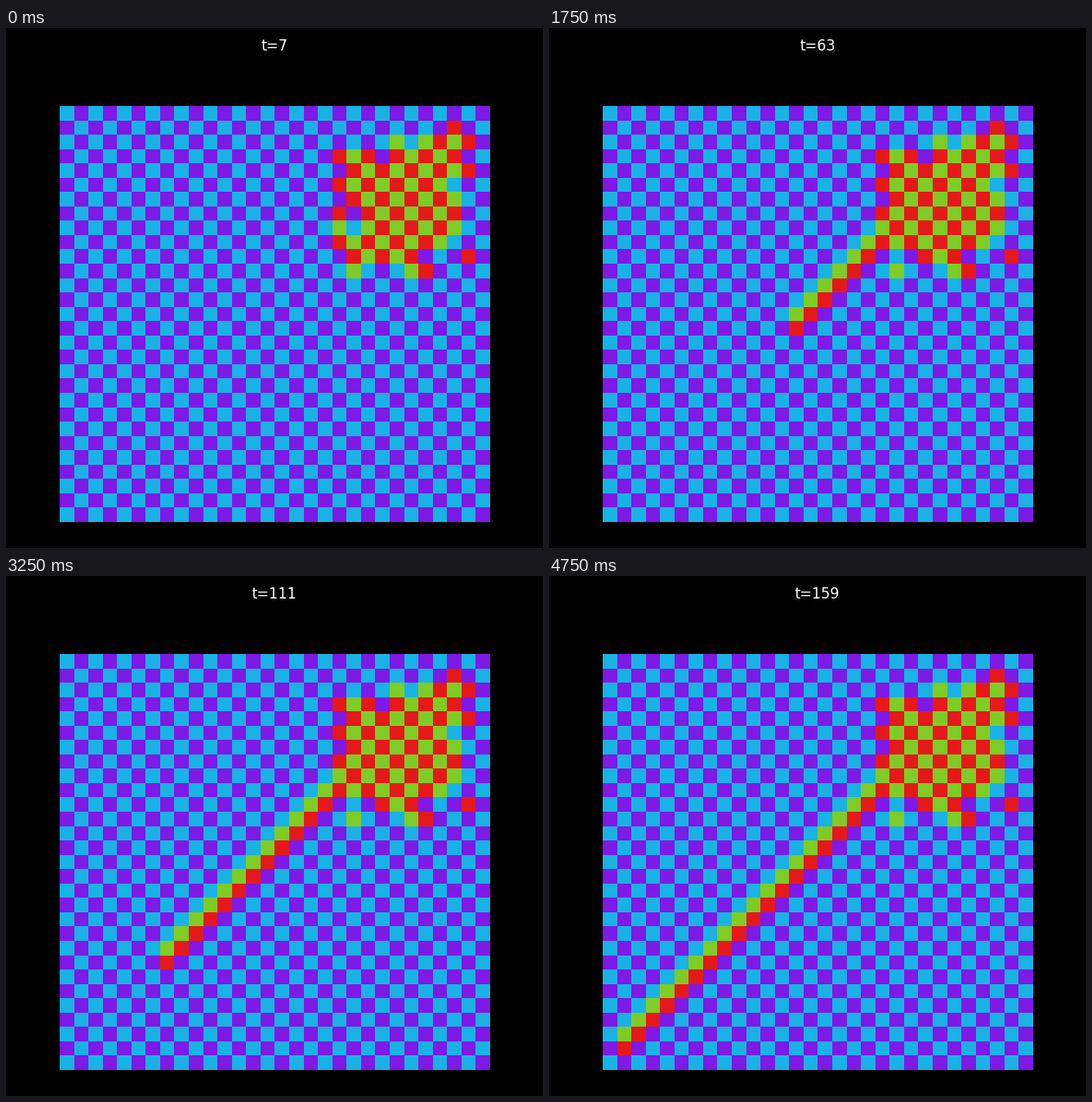
Write a matplotlib script that moves like this. It is 620x600 px and loops after 5000 ms.

```python
import numpy as np
import matplotlib.pyplot as plt
from matplotlib.animation import FuncAnimation

ROWS, COLS = 29, 30
FRAMES, INTERVAL = 20, 250
STEPS = 8  # walker moves per picture

# Checkerboard colours: [parity][visited]
PALETTE = np.array([
    [(0.1, 0.7, 0.9), (0.9, 0.1, 0.1)],
    [(0.5, 0.1, 0.9), (0.5, 0.8, 0.15)],
])
PARITY = np.add.outer(np.arange(ROWS), np.arange(COLS)) % 2


def first_patch():
    """Solid body, then its ragged rim, one side at a time."""
    cells = np.zeros((ROWS, COLS), dtype=int)
    cells[3:10, 20:28] = 1
    cells[3, 22] = cells[7:9, 20] = 0
    # left
    cells[3:10:2, 19] = cells[8, 19] = 1
    # top
    cells[2, 23:28:2] = cells[2, 26] = cells[1, 27] = 1
    # right
    cells[5:10:4, 27] = 0
    cells[2:5:2, 28] = cells[10, 28] = 1
    # bottom
    cells[10, 20:25] = cells[11, 24:26] = cells[11, 20] = 1
    return cells


def cells_at(k):
    cells = first_patch()
    if k > 1:
        cells[10, 20:22] = 0
    # once moving, the walker leaves a diagonal two cells thick
    for j in range(k + 1 if k else 0):
        cells[7 + j:9 + j, 20 - j] = 1
    return cells


def picture(k):
    return PALETTE[PARITY, cells_at(k)]


fig, ax = plt.subplots(figsize=(6.2, 6.0), dpi=100, facecolor="black")
fig.subplots_adjust(left=0, right=1, bottom=0.05, top=0.85)
ax.axis("off")
image = ax.imshow(picture(0), interpolation="nearest")
title = fig.suptitle("t=7", color="white", fontsize=12, family="DejaVu Sans")


def update(k):
    image.set_data(picture(k))
    title.set_text(f"t={STEPS * (k + 1) - 1}")
    return image, title


anim = FuncAnimation(fig, update, frames=FRAMES, interval=INTERVAL,
                     repeat=True, repeat_delay=0, blit=False)
plt.show()
```
